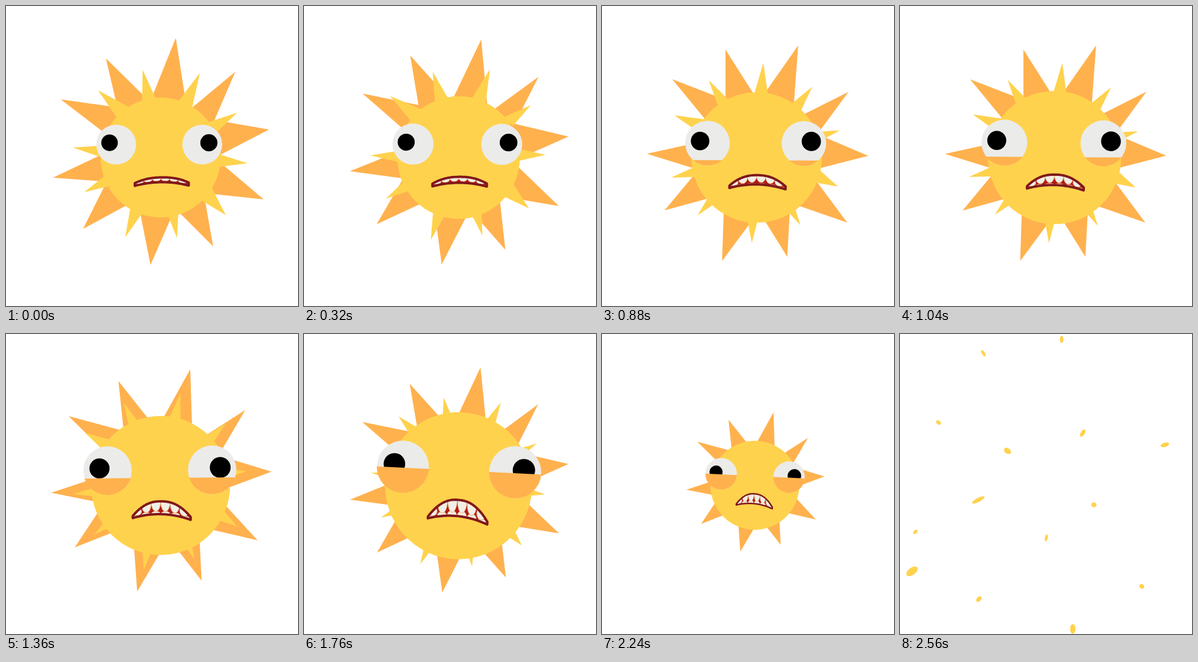
These frames come from a looping animation (485 px wide and 498 px high, 2880 ms). An HTML page with a canvas:

```html
<!DOCTYPE html>
<html lang="en">
<head>
<meta charset="utf-8">
<title>Sun</title>
<style>
  html, body { margin: 0; width: 100%; height: 100%; overflow: hidden; background: #fff; }
  canvas { display: block; }
</style>
</head>
<body>
<canvas id="stage" width="485" height="498"></canvas>
<script>
const ctx = document.getElementById('stage').getContext('2d');
const LOOP = 2880, STEP = 80, LAST = 32;
const YELLOW = '#ffd24d', ORANGE = '#ffb14e', WHITE = '#ebebe9';
const PIVOT = { x: 249.5, y: 250 };
const RAD = Math.PI / 180;

// Each ray: tip, then the two points where it meets the face.
const OUTER_RAYS = [
  [282, 53, 243, 150, 298, 155], [381, 109, 310, 168, 346, 190],
  [437, 205, 362, 192, 358, 246], [428, 321, 362, 265, 343, 312],
  [344, 399, 290, 345, 331, 325], [240, 430, 224, 349, 274, 352],
  [128, 370, 159, 308, 198, 332], [78, 285, 158, 247, 160, 291],
  [91, 155, 183, 168, 160, 208], [166, 87, 226, 146, 183, 160]
];
const INNER_RAYS = [
  [227, 106, 226, 156, 248, 152], [322, 111, 288, 156, 310, 165],
  [384, 177, 345, 190, 358, 202], [401, 261, 354, 246, 355, 267],
  [365, 347, 342, 302, 325, 323], [284, 385, 270, 350, 286, 348],
  [198, 384, 206, 338, 224, 347], [130, 309, 160, 285, 172, 299],
  [111, 235, 155, 232, 158, 251], [153, 140, 183, 184, 203, 167]
];
// Each drop: resting place, length, width, angle.
const DROPS = [
  [138.5, 32, 12, 5, 58], [268.5, 9, 12, 6, 90], [64, 147, 9, 6, 42],
  [303.5, 164.5, 14, 6.5, -57], [440, 184, 14.5, 7, -15], [178.5, 194, 13, 9, 38],
  [130, 275.5, 23, 6.5, -27], [322, 283.5, 8.5, 8, 0], [25.5, 328.5, 8.5, 5.5, -45],
  [243, 338.5, 11.5, 5, -78], [20, 394, 22, 12, -36], [131, 440, 11, 7, -50],
  [401.5, 419, 8.5, 7, 40], [287, 489.5, 16, 9, 90], [540, 330, 16, 8, 15]
];

const lerp = (a, b, t) => a + (b - a) * t;

function disc(x, y, r, color) {
  ctx.fillStyle = color;
  ctx.beginPath();
  ctx.arc(x, y, r, 0, 2 * Math.PI);
  ctx.fill();
}

function aroundPivot(angle, scale, draw) {
  ctx.save();
  ctx.translate(PIVOT.x, PIVOT.y);
  ctx.rotate(angle * RAD);
  ctx.scale(scale, scale);
  ctx.translate(-PIVOT.x, -PIVOT.y);
  draw();
  ctx.restore();
}

function drawRays(rays, color) {
  const reach = 1.25;
  ctx.fillStyle = color;
  for (const [x, y, ax, ay, bx, by] of rays) {
    ctx.beginPath();
    ctx.moveTo(x, y);
    ctx.lineTo(lerp(x, ax, reach), lerp(y, ay, reach));
    ctx.lineTo(lerp(x, bx, reach), lerp(y, by, reach));
    ctx.fill();
  }
}

function drawEye(side, grow, lid) {
  const size = 1 + 0.305 * grow;
  const x = 254.5 + 1.8 * grow + side * 71.5 * size;
  const y = 230 - 5.6 * grow;
  const r = 33.1 * size;
  disc(x, y, r, WHITE);
  disc(x + side * 11 * size, y - 3 * size, (14 + side * 0.25) * size, '#000');
  if (lid >= 1) return;
  const edge = Math.asin(lid);
  ctx.fillStyle = ORANGE;
  ctx.beginPath();
  ctx.arc(x, y, r + 0.3, edge, Math.PI - edge);
  ctx.fill();
}

function drawMouth(grow) {
  const left = lerp(214, 208.5, grow), right = lerp(303.5, 307.5, grow);
  const arch = (l, r, mid, power) => u =>
    lerp(l, r, u) - ((l + r) / 2 - mid) * (1 - Math.abs(2 * u - 1) ** power);
  const top = arch(lerp(294, 305, grow), lerp(293, 309, grow), lerp(284.5, 275, grow), 2.3);
  const bottom = arch(lerp(298.5, 308, grow), lerp(298, 313.5, grow), lerp(292.5, 302, grow), 2);
  const lips = new Path2D();
  const n = 40;
  for (let k = 0; k <= n; k++) lips.lineTo(lerp(left, right, k / n), top(k / n));
  for (let k = n; k >= 0; k--) lips.lineTo(lerp(left, right, k / n), bottom(k / n));
  lips.closePath();

  ctx.save();
  ctx.clip(lips);
  ctx.fillStyle = '#b3191b';
  ctx.fill(lips);
  ctx.fillStyle = '#f1eee6';
  ctx.strokeStyle = '#e8a65c';
  ctx.lineWidth = 0.8;
  for (let k = 0; k < 6; k++) {
    const u = 0.07 + 0.165 * k;
    const x = lerp(left, right, u), gap = bottom(u) - top(u);
    for (const [y, height] of [[bottom(u), gap * 0.34 * grow], [top(u), gap * 0.78]]) {
      ctx.beginPath();
      ctx.ellipse(x, y, 8, height, 0, 0, 2 * Math.PI);
      ctx.fill();
      ctx.stroke();
    }
  }
  ctx.restore();
  ctx.strokeStyle = '#80181a';
  ctx.lineWidth = 4;
  ctx.lineJoin = 'round';
  ctx.stroke(lips);
}

function drawHead(step) {
  const grow = (Math.min(step, 22) / 22) ** 1.35;
  const lid = Math.max(0.04, 0.98 - 0.0735 * (step - 8));
  disc(256.8, 251.5, 99.5 + 22.5 * grow, YELLOW);
  drawEye(-1, grow, lid);
  drawEye(1, grow, lid);
  drawMouth(grow);
}

function tiltAt(step) {
  if (step >= 20) return 1.4 * (1 + Math.cos((step - 22) * Math.PI / 3));
  return -0.45 * Math.min(1, step / 8) * Math.cos((step - 8) * 2 * Math.PI / 9);
}

function drawSun(step) {
  const sway = (1 - Math.cos(15.35 * step * RAD)) / 2;
  const tilt = tiltAt(step);
  const size = 1 - 0.395 * (Math.max(0, step - 24) / 4) ** 2;
  aroundPivot(tilt + 13 * sway, size ** 0.93, () => drawRays(OUTER_RAYS, ORANGE));
  aroundPivot(tilt - 21.2 * sway, size ** 2, () => drawRays(INNER_RAYS, YELLOW));
  aroundPivot(tilt, size, () => drawHead(step));
}

function drawDrops(progress) {
  const out = 1 - (1 - progress) ** 2;
  ctx.fillStyle = YELLOW;
  for (const [x, y, length, width, angle] of DROPS) {
    const swell = lerp(2, 1, progress) / 2;
    ctx.beginPath();
    ctx.ellipse(lerp(PIVOT.x, x, out), lerp(PIVOT.y, y, out),
      length * swell, width * swell, angle * RAD, 0, 2 * Math.PI);
    ctx.fill();
  }
}

function render(time) {
  const step = Math.min(LAST, Math.floor((time % LOOP) / STEP));
  ctx.fillStyle = '#fff';
  ctx.fillRect(0, 0, 485, 498);
  if (step < 30) drawSun(step);
  else drawDrops((step - 29) / 3);
}

const start = performance.now();
function tick() {
  render(performance.now() - start);
  requestAnimationFrame(tick);
}
tick();
</script>
</body>
</html>
```
